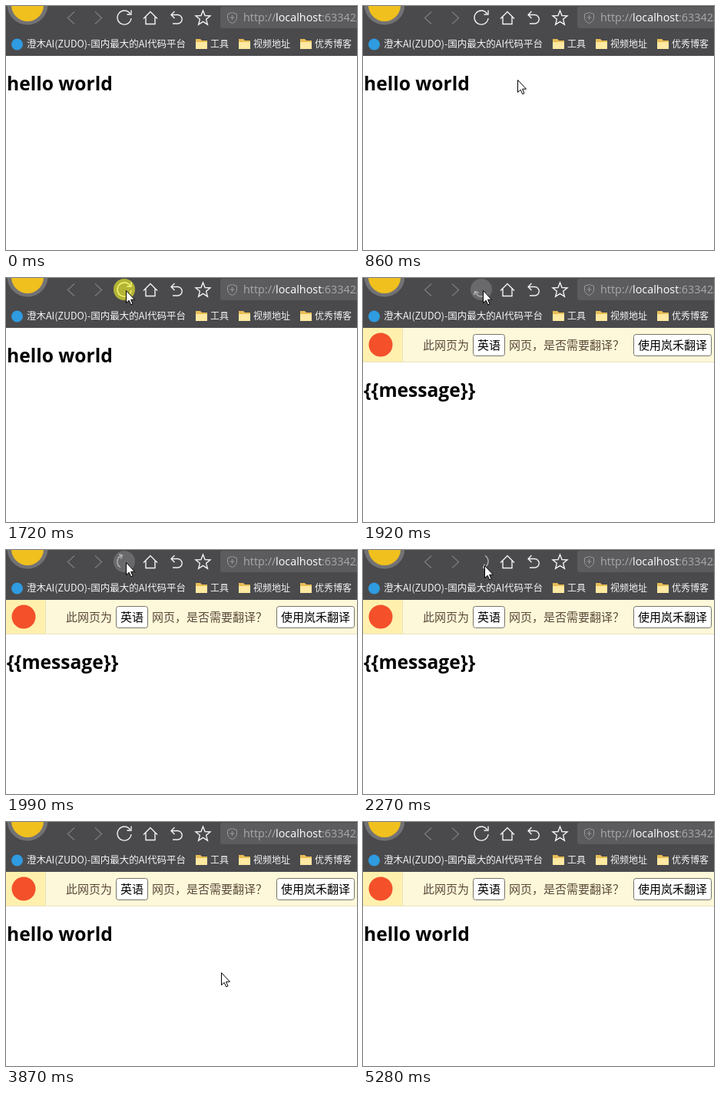
Write an HTML page that moves like this. It is 457 px wide and 318 px high and loops after 5680 ms.

```html
<!DOCTYPE html>
<html lang="zh">
<head>
<meta charset="utf-8">
<title>hello world</title>
<style>
html, body { margin: 0; width: 100%; height: 100%; overflow: hidden; background: #fff; }
svg { display: block; width: 100%; height: 100%; }
text { font: 15px "Noto Sans CJK SC", "Noto Sans CJK", sans-serif; white-space: pre; }
.icon { fill: none; stroke: #f2f2f2; stroke-width: 1.4; }
.off { stroke: #79797c; }
.mark { font-size: 12px; fill: #f4f4f4; }
.url { font: 14.4px "Open Sans", "Noto Sans", sans-serif; fill: #a9a9ab; }
.url .host { fill: #fff; }
.title { font: 700 24.6px "Open Sans", "Noto Sans", sans-serif; }
.ask { fill: #5a4938; }
.button { fill: #fff; stroke: #77736a; }
</style>
</head>
<body>
<svg viewBox="0 0 457 318">
  <defs>
    <g id="folder">
      <path d="M0 0H6L8 2H15V13H0Z" fill="#e9bd55"/>
      <path d="M0 4H15V13H0Z" fill="#ffe9a2"/>
    </g>
  </defs>

  <rect width="457" height="65" fill="#4a4a4d"/>
  <circle cx="28" cy="-2" r="26.5" fill="#727275"/>
  <circle cx="28" cy="-1" r="21" fill="#f0c01e"/>
  <path class="icon off" d="M89 7.5 80.500 15.500 89 23.500M116 7.500 124.500 15.500 116 23.500"/>

  <circle id="hover" cx="154" cy="15" r="14" fill="#69696c"/>
  <g id="reload" class="icon">
    <path d="M161.500 10A9 9 0 1 0 163 16"/>
    <path d="M163 5.500V11H157.500"/>
  </g>
  <g id="spinner" class="icon" style="stroke:#b4b4b6">
    <path d="M149 22.500A8.500 8.500 0 0 1 150 7.500"/>
    <path d="M147 5.500 151.500 7 149.500 11.500"/>
  </g>
  <circle id="click" cx="154" cy="15" r="14" fill="#ff0" fill-opacity=".5"/>

  <path class="icon" d="M179 16.500 188 7.500 197 16.500M182 14V23.500H194V14"/>
  <path class="icon" d="M219.500 7 215 11.500 219.500 16M215 11.500H223.500A5.700 5.700 0 0 1 223.500 23H217"/>
  <path id="star" class="icon"/>

  <path d="M457 1H282a3 3 0 0 0-3 3V26a3 3 0 0 0 3 3H457Z" fill="#5c5c5f"/>
  <path class="icon" style="stroke:#98989a;stroke-width:1" d="M294.500 8.500 300.500 10.500V15Q300.500 20 294.500 22.500 288.500 20 288.500 15V10.500ZM294.500 12V18M291.500 15H297.500"/>
  <text class="url" y="20"><tspan x="309">http://</tspan><tspan class="host" x="351">localhost</tspan><tspan x="411">:63342/</tspan></text>

  <circle cx="14.500" cy="50" r="7.500" fill="#2f9be0"/>
  <text class="mark" x="27" y="54" style="font-size:12.5px">澄木AI(ZUDO)-国内最大的AI代码平台</text>
  <use href="#folder" x="247" y="43"/><text class="mark" x="266" y="54">工具</text>
  <use href="#folder" x="303" y="43"/><text class="mark" x="322" y="54">视频地址</text>
  <use href="#folder" x="383" y="43"/><text class="mark" x="402" y="54">优秀博客</text>

  <g id="bar">
    <rect y="65" width="457" height="45" fill="#fef8da"/>
    <rect y="65" width="52" height="45" fill="#fff0ae"/>
    <path d="M51.500 65V109.500M0 109.500H457" stroke="#ebe2bd"/>
    <circle cx="23" cy="87" r="15.500" fill="#f4502a"/>
    <text class="ask" x="78" y="93">此网页为</text>
    <rect class="button" x="143.500" y="73.500" width="41" height="28" rx="3"/>
    <text x="149" y="93">英语</text>
    <text class="ask" x="190" y="93">网页，是否需要翻译？</text>
    <rect class="button" x="352.500" y="73.500" width="101" height="28" rx="3"/>
    <text x="358" y="93">使用岚禾翻译</text>
  </g>

  <text id="title" class="title" x="1"></text>
  <path id="cursor" d="M.5 .5V16.500L4.200 13.200 6.700 18.800 9 17.800 6.600 12.200H11.500Z" fill="#fff" stroke="#000"/>
</svg>
<script>
const LOOP = 5680;
const $ = id => document.getElementById(id);
const show = (id, on) => $(id).style.display = on ? "" : "none";

// Each move: start, time per step, last step, then a quadratic curve
const moves = [
  [600, 65, 8, [331, 252], [156, 51], [160, 30]],
  [1190, 60, 1, [158, 22], [157, 19], [157, 17]],
  [1450, 60, 1, [156, 16], [156, 16], [156, 16]],
  [2270, 70, 1, [158, 20], [160, 25], [163, 31]],
  [2340, 66, 5, [172, 45], [238, 138], [280, 196]],
  [4940, 85, 3, [287, 206], [318, 250], [357, 302]]
];

function cursorAt(t) {
  const move = moves.findLast(m => t >= m[0]);
  if (!move || t >= 5280) return null;
  const [start, step, last, a, b, c] = move;
  const u = Math.min(last, Math.floor((t - start) / step)) / last, v = 1 - u;
  return a.map((p, i) => Math.round(v * v * p + 2 * u * v * b[i] + u * u * c[i]));
}

const starPoints = Array.from({ length: 10 }, (_, i) => {
  const r = i % 2 ? 4.3 : 10, angle = i * Math.PI / 5;
  return [256.5 + r * Math.sin(angle), 16 - r * Math.cos(angle)];
});
$("star").setAttribute("d", "M" + starPoints.join("L") + "Z");

function draw() {
  const t = performance.now() % LOOP;
  const loading = t >= 1860 && t < 2340;
  const reloaded = t >= 1920;

  show("hover", t >= 1120 && t < 2270);
  show("click", t >= 1720 && t < 1860);
  show("reload", !loading);
  show("spinner", loading);
  const turn = Math.floor((t - 1990) / 68) * 45;
  $("spinner").setAttribute("transform", `rotate(${turn} 154 15)`);

  show("bar", reloaded);
  $("title").textContent = reloaded && t < 3870 ? "{{message}}" : "hello world";
  $("title").setAttribute("y", reloaded ? 155 : 110);

  const pos = cursorAt(t);
  show("cursor", pos);
  if (pos) $("cursor").setAttribute("transform", `translate(${pos})`);
  requestAnimationFrame(draw);
}
draw();
</script>
</body>
</html>
```
